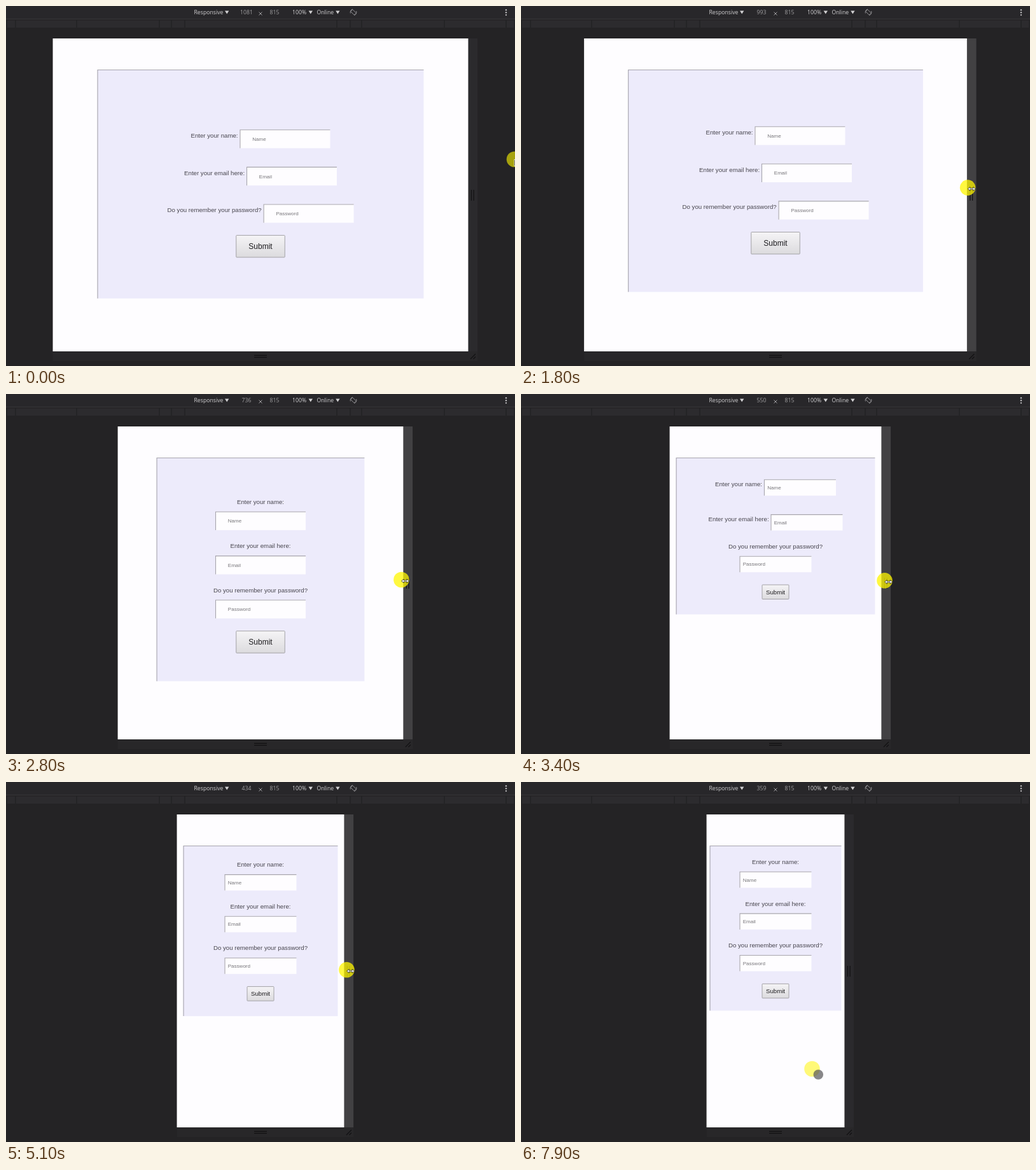
An HTML page for the animation above (8000 ms loop, 800 px wide and 566 px high).

```html
<!DOCTYPE html>
<html lang="en">
<head>
<meta charset="utf-8">
<title>Responsive form</title>
<style>
  html, body { margin: 0; width: 100%; height: 100%; overflow: hidden; background: #242325; }
  svg { display: block; width: 800px; height: 566px; }
  text { font-family: "Liberation Sans", Arial, sans-serif; white-space: pre; }
  .bar text { font-family: "Open Sans", "Noto Sans", sans-serif; font-size: 8.7px; fill: #d2d1d3; }
  .bar .dim { fill: #a09fa1; }
  .label { font-size: 9.66px; fill: #48464e; }
  .hint { font-size: 8.05px; fill: #77767a; }
</style>
</head>
<body>
<svg viewBox="0 0 800 566" xmlns="http://www.w3.org/2000/svg">
  <defs>
    <linearGradient id="face" x2="0" y2="1">
      <stop offset="0" stop-color="#f5f4f6"/><stop offset="1" stop-color="#dcdbde"/>
    </linearGradient>
  </defs>
  <rect width="800" height="566" fill="#242325"/>
  <g class="bar">
    <rect width="800" height="20" fill="#28272a"/>
    <rect y="20" width="800" height="1" fill="#38373a"/>
    <g id="ruler" fill="#2c2b2e"></g>
    <text x="295.5" y="13.3">Responsive</text>
    <text id="size" class="dim" x="378" y="13.3" text-anchor="middle"></text>
    <path d="M397.5 9.5l5 5m0-5l-5 5" stroke="#a09fa1"/>
    <text class="dim" x="422" y="13.3" text-anchor="middle">815</text>
    <text x="450" y="13.3">100%</text>
    <text x="488.5" y="13.3">Online</text>
    <path d="M344 7.5h6.4l-3.2 5zM475.6 7.5h6.4l-3.2 5zM518.2 7.5h6.4l-3.2 5z" fill="#d2d1d3"/>
    <g fill="none" stroke="#98979a" stroke-width=".9">
      <rect x="543.8" y="5.8" width="4.4" height="8" rx=".6" transform="rotate(-45 546 9.8)"/>
      <path d="M541.4 11.5A4.9 4.9 0 0 1 545 5M550.6 8A4.9 4.9 0 0 1 547 14.6"/>
    </g>
    <g fill="#bdbcbe"><circle cx="786" cy="6.3" r="1.2"/><circle cx="786" cy="10.2" r="1.2"/><circle cx="786" cy="14.1" r="1.2"/></g>
  </g>
  <g id="view"></g>
  <g id="pointer"></g>
</svg>
<script>
const LOOP = 8000, STEP = 100, SCALE = 0.604;
const $ = id => document.getElementById(id);

const viewport = [[0, 1081], [1400, 1081], [1600, 1045], [2200, 899], [2300, 877], [2800, 743], [3200, 560],
  [3800, 533], [3900, 533], [4300, 466], [4800, 466], [5600, 384], [5700, 384], [6000, 379], [6200, 377],
  [6300, 377], [6800, 359]];
const gutter = [[362, 50], [449, 61], [543, 68], [653, 70]];
const approachX = [[0, 799], [900, 733], [1400, 732.5]];
const pointerY = [[0, 241], [900, 288], [2200, 284.5], [2800, 292], [4300, 295.5], [6000, 295], [7300, 296],
  [7500, 340], [7700, 400], [7900, 451]];
const leaveX = [[7300, 514], [7500, 450], [7700, 421], [7900, 457.5]];
const glow = [[0, 0.6], [900, 0.75], [7300, 0.75], [7500, 0.53]];

const fields = [
  { label: "Enter your name:", hint: "Name", width: 74.2, wrap: [457, 270] },
  { label: "Enter your email here:", hint: "Email", width: 95.3, wrap: [488, 291] },
  { label: "Do you remember your password?", hint: "Password", width: 148.5, wrap: [566, 344] }
];

function track(points, at) {
  if (at <= points[0][0]) return points[0][1];
  for (let i = 1; i < points.length; i++) {
    const [a, from] = points[i - 1], [b, to] = points[i];
    if (at <= b) return from + (to - from) * (at - a) / (b - a);
  }
  return points[points.length - 1][1];
}

const rect = (x, y, w, h, fill, extra = "") =>
  `<rect x="${x}" y="${y}" width="${w}" height="${h}" fill="${fill}" ${extra}/>`;
const text = (x, y, content, cls, extra = "") =>
  `<text x="${x}" y="${y}" class="${cls}" ${extra}>${content}</text>`;
const line = (d, color, width = 1) =>
  `<path d="${d}" fill="none" stroke="${color}" stroke-width="${width}"/>`;
const inset = (x, y, w, h, fill) => rect(x, y, w, h, fill) +
  line(`M${x + 0.5} ${y + h}V${y + 0.5}H${x + w}`, "#a7a5ad", 1.1);

function drawForm(w) {
  const small = w < 362, tiny = w < 241.6;
  const margin = tiny ? 5 : small ? 10 : track(gutter, w);
  const pad = tiny ? 0.7 : small ? 5 : w * 0.0995;
  const inputW = small ? 113 : 142, inputH = small ? 25.5 : 29.3;
  let y = 100 + pad, out = "";

  for (const f of fields) {
    const stacked = w < f.wrap[small ? 1 : 0];
    const top = y + (stacked ? 40.1 : 29.3);
    const x = stacked ? 400 - inputW / 2 : 400 + (f.width + 2.7 - inputW) / 2;
    out += stacked
      ? text(400, y + 28.2, f.label, "label", 'text-anchor="middle"')
      : text(x - 2.9, top + (small ? 10.4 : 12.8), f.label, "label", 'text-anchor="end"');
    out += inset(x, top, inputW, inputH, "#fefdff");
    out += text(x + (small ? 5.2 : 19.8), top + inputH / 2 + 3, f.hint, "hint");
    y = top + inputH;
  }

  const bw = small ? 42 : 76.5, bh = small ? 22.5 : 34.5, font = small ? 9.66 : 12;
  y += 19.5;
  out += rect(400 - bw / 2, y + 0.3, bw, bh, "url(#face)", 'rx=".8" stroke="#a3a2a6"');
  out += text(400, y + bh / 2 + font * 0.37, "Submit", "",
    `text-anchor="middle" font-size="${font}" fill="#1d1c1f"`);
  const bottom = y + bh + pad + (small ? 19.3 : 0);
  return inset(400 - w / 2 + margin, 100, w - 2 * margin, bottom - 100, "#edebfb") + out;
}

function drawView(w, active) {
  const left = 400 - w / 2, right = 400 + w / 2;
  const grip = "#121113";
  return rect(left, 543, w + 15, 15, "#282729") +
    rect(right, 51, 14.7, 492, active ? "#424143" : "#2b2a2d") +
    line(`M${right + 5} 289v17m3.7 0v-17`, grip, 1.2) +
    line("M390 549.3h20m0 3h-20", grip, 1.2) +
    line(`M${right + 3.5} 555l8-8m0 4.5l-3.5 3.5`, grip, 1.1) +
    rect(left, 51, w, 492, "#fefdff") + drawForm(w);
}

function drawPointer(t) {
  const jumped = t >= 7000 && t < 7200;
  const onPage = jumped || t >= 7400;
  const edge = 400 + track(viewport, t + 65) * SCALE / 2;
  const x = jumped ? 455 : t >= 7300 ? track(leaveX, t) : t < 1400 ? track(approachX, t) : edge + 6;
  const y = jumped ? 206 : track(pointerY, t);
  let shape;
  if (onPage) {
    shape = '<circle cx="9.8" cy="9" r="7.8" fill="#555457" fill-opacity=".7"/>';
  } else if (x > 738) {
    shape = '<path d="M0 0v11l2.6-2.3 1.8 4 1.7-.8-1.8-3.8h3.5z" fill="#222" stroke="#fff" stroke-width=".8"/>';
  } else {
    shape = '<path d="M.2 2l3.5-3v2h5v-2l3.5 3-3.5 3v-2h-5v2z" fill="#fff" stroke="#222" stroke-width=".8"/>';
  }
  return `<g transform="translate(${x} ${y})"><circle r="12.3" fill="#fff600" fill-opacity="${track(glow, t)}"/>${shape}</g>`;
}

const ticks = [1, 15, 111, 241, 260, 281, 520, 541, 559, 689, 786, 799];
$("ruler").innerHTML = ticks.slice(1)
  .map((end, i) => rect(ticks[i] + 0.8, 22.5, end - ticks[i] - 1.6, 11.5, "inherit")).join("")
  .replaceAll('fill="inherit" ', "");

let shown = -1;
function render(now) {
  const t = Math.floor(now % LOOP / STEP) * STEP;
  if (t !== shown) {
    shown = t;
    $("size").textContent = Math.round(track(viewport, t + 15));
    $("view").innerHTML = drawView(track(viewport, t) * SCALE, t >= 1100 && t < 7400);
    $("pointer").innerHTML = drawPointer(t);
  }
}

const start = performance.now();
function tick() {
  render(performance.now() - start);
  requestAnimationFrame(tick);
}
tick();
</script>
</body>
</html>
```
